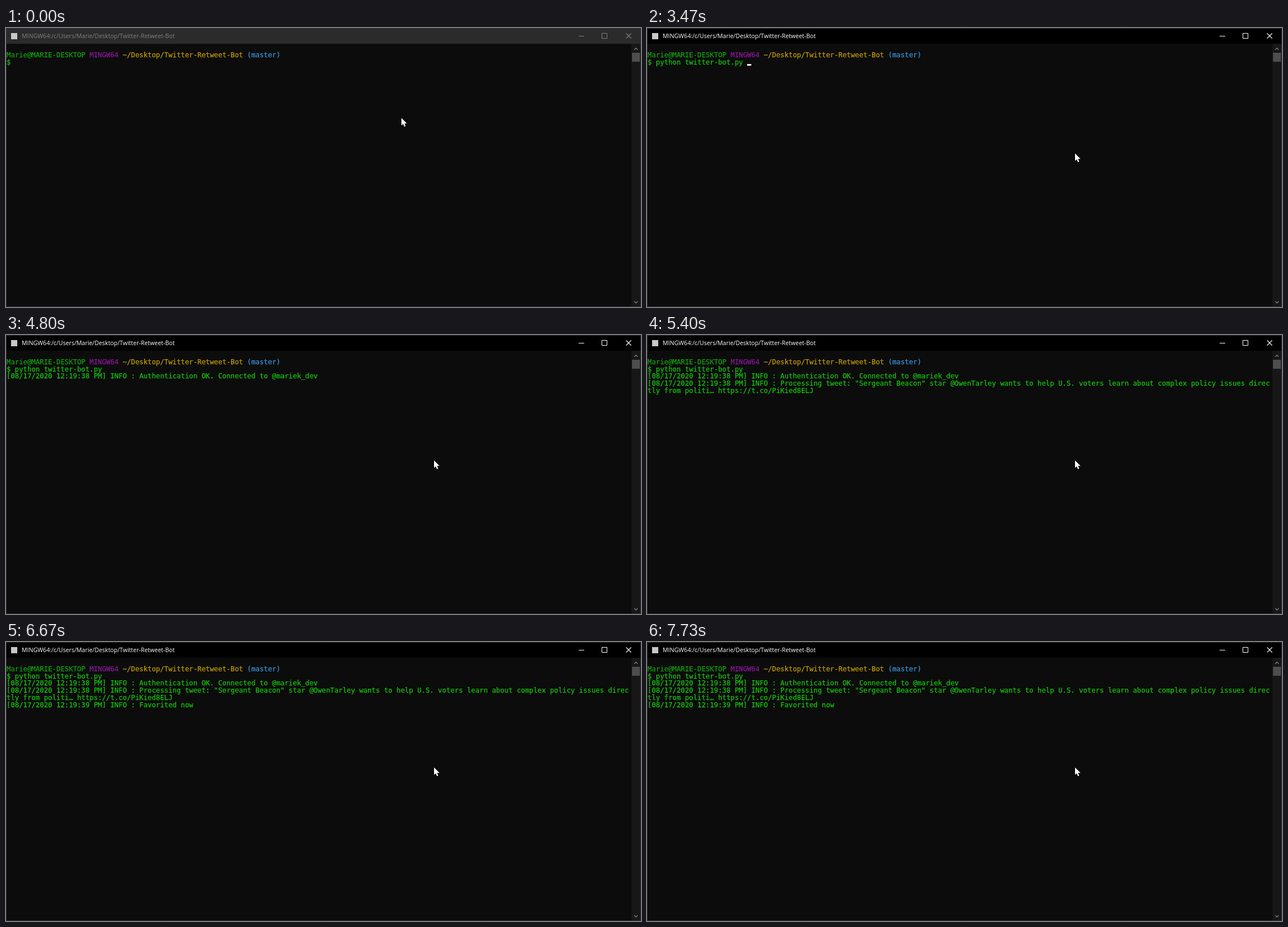
An HTML page with a canvas that plays this animation: 1129 by 496 pixels, repeating every 8 s.

```html
<!DOCTYPE html>
<html lang="en">
<head>
<meta charset="utf-8">
<title>Terminal</title>
<style>
html, body { margin: 0; width: 1129px; height: 496px; overflow: hidden; background: #0c0c0c; }
canvas { display: block; }
</style>
</head>
<body>
<canvas id="stage" width="1129" height="496"></canvas>
<script>
const ctx = document.getElementById('stage').getContext('2d', { alpha: false });
const LOOP = 8000, CELL = 7.375, LINE = 12.9;
const GREEN = '#16c60c';

// When each output line appears, its row, column, colour and text
const output = [
  [0, 0, 0, '#13a10e', 'Marie@MARIE-DESKTOP'],
  [0, 0, 20, '#881798', 'MINGW64'],
  [0, 0, 28, '#c19c00', '~/Desktop/Twitter-Retweet-Bot'],
  [0, 0, 58, '#3a96dd', '(master)'],
  [0, 1, 0, GREEN, '$'],
  [3470, 1, 2, GREEN, 'python twitter-bot.py'],
  [4800, 2, 0, GREEN, '[08/17/2020 12:19:38 PM] INFO : Authentication OK. Connected to @mariek_dev'],
  [5400, 3, 0, GREEN, '[08/17/2020 12:19:38 PM] INFO : Processing tweet: "Sergeant Beacon" star @OwenTarley wants to help U.S. voters learn about complex policy issues direc'],
  [5400, 4, 0, GREEN, 'tly from politi… https://t.co/PiKied8ELJ'],
  [5600, 5, 0, GREEN, '[08/17/2020 12:19:39 PM] INFO : Favorited now']
];

// Text cursor: from, to, row, column
const carets = [
  [3470, 3930, 1, 24],
  [3930, 4600, 2, 0],
  [6130, 6670, 6, 0],
  [7200, 7730, 6, 0]
];

// Mouse pointer: from, x, y
const pointer = [[0, 703, 160], [70, 760, 220], [3470, 761, 223]];
const arrow = new Path2D('M0 0V13.2L3 10.4L5.2 15.5L7.5 14.6L5.3 9.7H9.8Z');

function rect(color, x, y, w, h) {
  ctx.fillStyle = color;
  ctx.fillRect(x, y, w, h);
}

function stroke(color, path, width = 1) {
  ctx.strokeStyle = color;
  ctx.lineWidth = width;
  ctx.stroke(new Path2D(path));
}

function drawWindow(active) {
  const ink = active ? '#fff' : '#808080';
  rect('#0c0c0c', 0, 0, 1129, 496);
  rect(active ? '#000' : '#2b2b2b', 0, 0, 1129, 28);
  stroke(active ? '#303236' : '#2c353d', 'M.5 .5H1128.5V495.5H.5Z');

  rect('#c8c8c8', 9, 9, 11, 11);
  ctx.font = '10.55px "Open Sans", sans-serif';
  ctx.fillStyle = ink;
  ctx.fillText('MINGW64:/c/Users/Marie/Desktop/Twitter-Retweet-Bot', 28, 18);
  stroke(ink, 'M1018 14.5H1028M1059.5 9.5H1068.5V18.5H1059.5Z');
  stroke(ink, 'M1102.5 9.5L1111.5 18.5M1111.5 9.5L1102.5 18.5', 1.1);

  rect('#171717', 1112, 28, 16, 467);
  rect('#4d4d4d', 1113, 44, 14, 16);
  stroke('#777', 'M1117 38.8L1120 35.8L1123 38.8M1117 486L1120 489L1123 486', 1.5);
}

function draw(t) {
  drawWindow(t >= 3470);

  ctx.font = '12.25px "DejaVu Sans Mono", monospace';
  ctx.lineWidth = 0.25;
  for (const [from, row, col, color, text] of output) {
    if (t < from) continue;
    const x = 1 + col * CELL, y = Math.round(51.6 + row * LINE);
    ctx.fillStyle = ctx.strokeStyle = color;
    ctx.fillText(text, x, y);
    ctx.strokeText(text, x, y);
  }
  for (const [from, to, row, col] of carets) {
    if (t >= from && t < to) rect('#f2f2f2', 1 + col * CELL, Math.floor(51.5 + row * LINE), CELL, 3);
  }

  const [, x, y] = pointer.findLast(p => t >= p[0]);
  ctx.save();
  ctx.translate(x, y);
  ctx.strokeStyle = '#000';
  ctx.lineWidth = 1.5;
  ctx.stroke(arrow);
  ctx.fillStyle = '#fff';
  ctx.fill(arrow);
  ctx.restore();
}

const start = performance.now();
function frame() {
  draw((performance.now() - start) % LOOP);
  requestAnimationFrame(frame);
}
frame();
</script>
</body>
</html>
```
